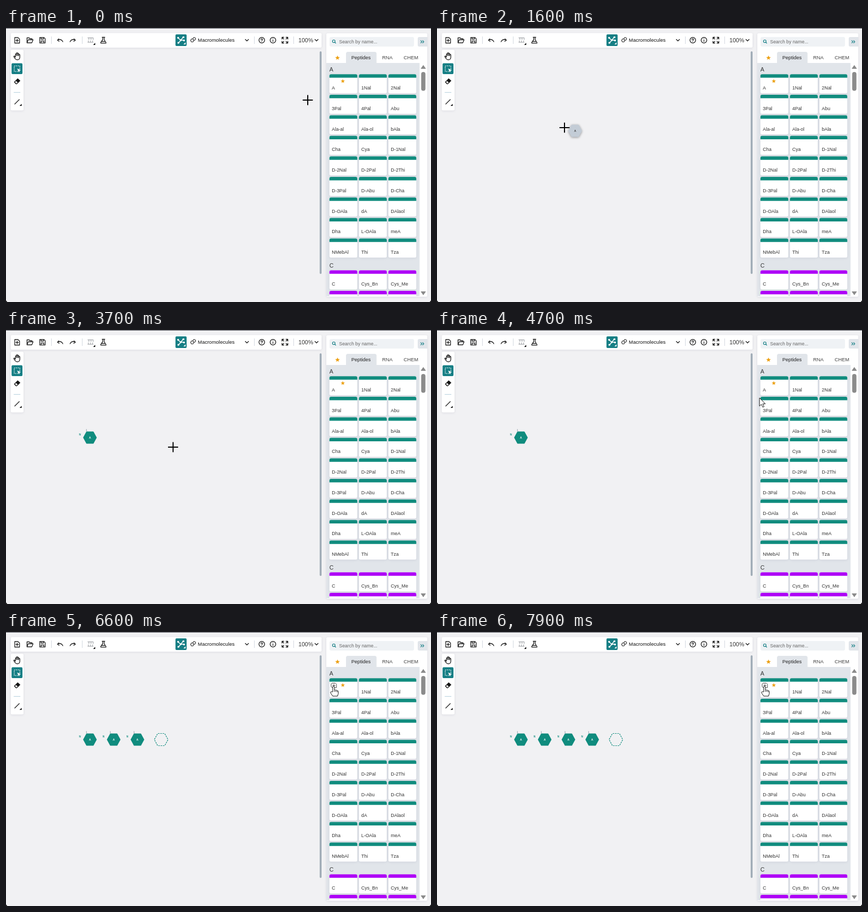
An HTML page that plays this animation: 800 px wide and 517 px high, repeating every 8 s.

```html
<!DOCTYPE html>
<html lang="en">
<head>
<meta charset="utf-8">
<title>Macromolecule editor</title>
<style>
  html, body { margin: 0; width: 100%; height: 100%; overflow: hidden; background: #f1f1f3; }
  svg { display: block; width: 800px; height: 517px; font-family: "Liberation Sans", Arial, sans-serif; fill: #333; }
  .ico { fill: none; stroke: #222; stroke-width: 1.35; stroke-linejoin: round; stroke-linecap: round; }
  .white { fill: #fff; }
  .soft { filter: drop-shadow(0 1px 2px #67688426); }
  .mid { text-anchor: middle; }
</style>
</head>
<body>
<svg viewBox="0 0 800 517">
  <defs>
    <path id="hex" d="M-12.6,-.6L-6.9,-10.9Q-6.5,-11.5 -5.8,-11.5H5.8Q6.5,-11.5 6.9,-10.9L12.6,-.6Q13,0 12.6,.6L6.9,10.9Q6.5,11.5 5.8,11.5H-5.8Q-6.5,11.5 -6.9,10.9L-12.6,.6Q-13,0 -12.6,-.6Z"/>
    <path id="star" d="M0,-4.6L1.2,-1.5 4.4,-1.4 1.9,.6 2.7,3.7 0,1.9 -2.7,3.7 -1.9,.6 -4.4,-1.4 -1.2,-1.5Z" fill="#eca113"/>
    <path id="chevron" class="ico" d="M-3,-1.5L0,1.5 3,-1.5"/>
    <path id="corner" d="M0,4H4V0Z" fill="#111"/>
    <clipPath id="list"><rect x="603" y="66" width="176" height="440"/></clipPath>
  </defs>

  <rect width="800" height="1" fill="#50535a"/>
  <path d="M0,514L2.500,517H0ZM800,514L797.500,517H800Z" fill="#111"/>

  <!-- top bar -->
  <rect class="white soft" x="9" y="9.500" width="585" height="27.500" rx="2.500"/>
  <path d="M85.500,16V30M143.500,16V30M467.500,16V30M541.500,16V30" stroke="#d3d8df" fill="none"/>
  <g class="ico">
    <path d="M16.500,18H22.500L25.500,21V28.500H16.500ZM21,21V26M18.600,23.500H23.400"/>
    <path d="M39.500,28V18.500H43.500L45,20.200H49V22M39.500,28L41.800,22.200H51L48.500,28Z"/>
    <path d="M63.500,18H71.500L73.700,20.200V28.300H63.500ZM66,18V21H70.500V18M66,28V24.500H71.200V28"/>
    <path d="M99.500,20.500L96.800,23 100,25.300M97,23Q104,19.500 107,26"/>
    <path d="M128,20.500L130.700,23 127.500,25.300M130.500,23Q123.500,19.500 120.500,26"/>
    <path d="M154,18.500H164M154,27H164M156,18.500V22M160,18.500V22M164,18.500V22M155,27V24M159,27V24M163,27V24" stroke="#9a9da2" stroke-width="1.100"/>
    <path d="M181,17.500H186M182,18V22L178.300,27.500Q178,28.600 179,28.600H187.600Q188.600,28.600 188.200,27.500L184.800,22V18M180,25.500H187"/>
    <path d="M347.500,23.500L349,20.800H352L353.500,23.500 352,26.200H349ZM351.500,20.600L353,18H355.500L357,20.500 355.500,23H353.500" stroke-width="1.100"/>
    <circle cx="481.500" cy="23" r="5.300"/><path d="M479.900,22Q479.900,20.300 481.500,20.300T483.100,21.800Q483,22.700 481.500,23.700M481.500,25.600V25.700"/>
    <circle cx="502.500" cy="23" r="5.300"/><path d="M502.500,22.800V25.500M502.500,20.400V20.500"/>
    <path d="M519.500,21V17.500H523M527,17.500H530.500V21M530.500,25V28.500H527M523,28.500H519.500V25M520,18L523,21M530,18L527,21M530,28L527,25M520,28L523,25"/>
  </g>
  <rect x="319" y="12" width="21" height="22" rx="2" fill="#167f85"/>
  <g class="ico" style="stroke:#fff"><path d="M324,19L329,23H334M329,23L325,28M329,23L333,18"/></g>
  <g class="white"><circle cx="324" cy="18.500" r="1.800"/><circle cx="334" cy="17.500" r="1.800"/><circle cx="329" cy="23" r="1.800"/><circle cx="335" cy="23.500" r="1.800"/><circle cx="324.500" cy="28" r="1.800"/><path d="M334,31H338V27Z"/></g>
  <use href="#corner" x="164" y="28"/>
  <text x="361" y="26" font-size="9.500" fill="#111">Macromolecules</text>
  <use href="#chevron" x="453.500" y="23"/>
  <text x="550.500" y="26.500" font-size="10.900">100%</text>
  <use href="#chevron" x="584.500" y="23"/>

  <!-- left tools -->
  <rect class="white soft" x="9" y="41" width="24" height="114.500" rx="2.500"/>
  <path class="ico" d="M17.700,55V49.500Q18.700,47.800 19.700,49.500V52V47.500Q20.700,46 21.700,47.500V52V48.200Q22.700,46.800 23.700,48.200V52.500V50.500Q25.200,49 26,50.500V55.500Q25.500,60 21.500,60Q18.500,60 17,57.500L14.700,54.200Q14.800,52.600 16.200,53.200Z"/>
  <rect x="10.500" y="66.500" width="20.500" height="20.500" rx="2" fill="#167f85"/>
  <rect x="15.500" y="71.500" width="10.500" height="10.500" fill="none" stroke="#fff" stroke-width="1.200" stroke-dasharray="2 1.500"/>
  <path d="M21,76.500L28,79.200 25,80.500 24,83.500Z" class="white"/>
  <path d="M15,102L22,95 27,99.500 20.500,106H18.500Z" fill="#151515"/><path d="M17,102L19,100 22,103 19.500,105Z" class="white"/>
  <path d="M14.500,121.500H27" stroke="#b5cfdd"/>
  <path class="ico" d="M16.500,143.500L25,135"/>
  <use href="#corner" x="25.500" y="143"/>

  <rect x="590.500" y="44" width="3.500" height="420" rx="1.700" fill="#9fabb6"/>

  <!-- library -->
  <rect class="white soft" x="603" y="10" width="190" height="497" rx="2.500"/>
  <rect x="609" y="17" width="159" height="18" rx="3" fill="#eff2f5"/>
  <path d="M618.500,26.500L621,29" stroke="#167f85" stroke-width="1.300"/><circle cx="617" cy="25" r="2.500" fill="none" stroke="#167f85" stroke-width="1.200"/>
  <text x="627" y="29.300" font-size="8.900" fill="#666">Search by name...</text>
  <path d="M793,17H778Q775,17 775,20V32Q775,35 778,35H793Z" fill="#e1e5ea"/>
  <path d="M780.500,23.500L783,26 780.500,28.500M784,23.500L786.500,26 784,28.500" fill="none" stroke="#167f85" stroke-width="1.100"/>
  <path d="M640,66V48.500Q640,45 643.500,45H694Q697.500,45 697.500,48.500V66Z" fill="#e1e5ea"/>
  <use href="#star" x="624" y="56.300"/>
  <g font-size="9.400" fill="#444"><text x="650" y="59.200" fill="#222">Peptides</text><text x="708" y="59.200">RNA</text><text x="748.500" y="59.200">CHEM</text></g>
  <rect x="603" y="66" width="175.500" height="440" fill="#e1e5ea"/>
  <g id="cards" clip-path="url(#list)" font-size="8.900"></g>
  <use href="#star" x="634" y="100.300" transform="translate(63.400 10.030) scale(.9)"/>
  <path d="M785.500,70.500L789.700,76.500H781.300ZM785.500,503.500L789.700,497.500H781.300Z" fill="#8b8b8b" stroke="#8b8b8b" stroke-linejoin="round"/>
  <rect x="781.500" y="83" width="8" height="35.500" rx="4" fill="#8b8b8b"/>

  <g id="scene"></g>
</svg>
<script>
const $ = id => document.getElementById(id);
const TEAL = '#108c7e', VIOLET = '#ae02f7';

const card = (x, y, name, color) => `
  <rect class="white soft" x="${x}" y="${y}" width="52.500" height="36" rx="3"/>
  <path d="M${x},${y + 6.5}v-3.500q0,-3 3,-3h46.500q3,0 3,3v3.500z" fill="${color}"/>
  <text x="${x + 4.5}" y="${y + 29}">${name}</text>`;
const grid = (names, top, color) => names.split(' ')
  .map((n, i) => card(608.8 + i % 3 * 55.5, top + Math.floor(i / 3) * 38.75, n, color)).join('');

$('cards').innerHTML =
  '<g font-size="10.800"><text x="608.800" y="81.500">A</text><text x="608.800" y="451.500">C</text></g>' +
  grid('A 1Nal 2Nal 3Pal 4Pal Abu Ala-al Ala-ol bAla Cha Cya D-1Nal D-2Nal D-2Pal D-2Thi ' +
    'D-3Pal D-Abu D-Cha D-OAla dA DAlaol Dha L-OAla meA NMebAl Thi Tza', 87.2, TEAL) +
  grid('C Cys_Bn Cys_Me Cys C C', 457.3, VIOLET);

// Cursor path: time, x, y
const path = [
  [0, 568, 136], [600, 634, 108], [800, 634, 108], [1000, 577.5, 138], [1600, 240, 188],
  [1900, 139, 197], [2200, 148, 191], [2900, 148, 191], [3200, 168, 200],
  [3700, 314.5, 221], [4700, 607, 128], [5000, 616.5, 102], [8000, 616.5, 102]
];
const DRAG = 800, DROP = 1900, HOVER = 5000, CLICKS = [5600, 6400, 7200];
const first = { x: 158, y: 203, step: 44.7 };

function cursorAt(t) {
  const i = path.findIndex(p => p[0] > t);
  const [t0, x0, y0] = path[i - 1], [t1, x1, y1] = path[i];
  const k = (t - t0) / (t1 - t0);
  return [x0 + (x1 - x0) * k, y0 + (y1 - y0) * k];
}

const at = (x, y, body) => `<g transform="translate(${x} ${y})">${body}</g>`;
const monomer = i => at(first.x + i * first.step, first.y, `
  <use href="#hex" fill="${TEAL}"/>
  <text class="mid white" y="2" font-size="5" font-weight="bold">A</text>
  <text class="mid" x="-19" y="-4" font-size="4.500" font-weight="bold" fill="${TEAL}">N</text>
  <text class="mid" x="-6.500" y="-12" font-size="4.500" fill="#567">1</text>`);
const slot = i => at(first.x + i * first.step, first.y,
  `<use href="#hex" fill="none" stroke="${TEAL}" stroke-width="1.200" stroke-dasharray="2.800 1.500"/>`);
const ghost = (x, y) => at(x, y, `
  <use href="#hex" fill="#c3ccd6" style="filter:drop-shadow(0 1px 2px #0006)"/>
  <text class="mid" y="2" font-size="5" font-weight="bold">A</text>`);

const cross = '<path d="M-9.500,0H9.500M0,-9.500V9.500" stroke="#000" stroke-width="2"/>';
const arrow = '<path class="white" stroke="#111" d="M0,0V15.500L3.600,12.200 6.200,17.700 8.700,16.600 6.200,11.300H11Z"/>';
const hand = `<path class="white" stroke="#111" stroke-linejoin="round" d="M-1.600,11V1.200Q0,-.8 1.600,1.200V7.500Q3.200,6.300 4.300,8
  Q5.800,7 6.800,8.800Q8.500,8 8.900,10V14.500L7.500,19H-1.500L-5.600,12.800Q-6,10.300 -3.800,10.700Z"/>
  <path d="M1.600,8V11M4.300,8.500V11M6.800,9V11.500" stroke="#111" stroke-width=".9"/>`;
const addIcon = `<path class="ico" style="stroke:#444;stroke-width:1" d="M-3,-4.500H3L5,-2.500V4H-3L-5,2V-2.500ZM-2,0H2.500M.2,-2.200V2.200"/>`;

function draw(t) {
  const [x, y] = cursorAt(t);
  const count = t < DROP ? 0 : 1 + CLICKS.filter(c => t >= c).length;
  let out = '';
  if (count && Math.hypot(x - first.x, y - first.y) < 16)
    out += `<circle cx="${first.x}" cy="${first.y}" r="16" fill="#8cf29b"/>`;
  for (let i = 0; i < count; i++) out += monomer(i);
  if (t >= HOVER) out += slot(count) + at(617, 101, addIcon);
  if (t > DRAG && t < DROP) out += ghost(x + 20, y + 6);
  const overMonomer = count && x < 175;
  out += at(x, y, x > 609 ? hand : x > 590 || overMonomer ? arrow : cross);
  $('scene').innerHTML = out;
}

let last = -1;
function tick() {
  const t = Math.floor(performance.now() % 8000 / 100) * 100;
  if (t !== last) draw(last = t);
  requestAnimationFrame(tick);
}
tick();
</script>
</body>
</html>
```
